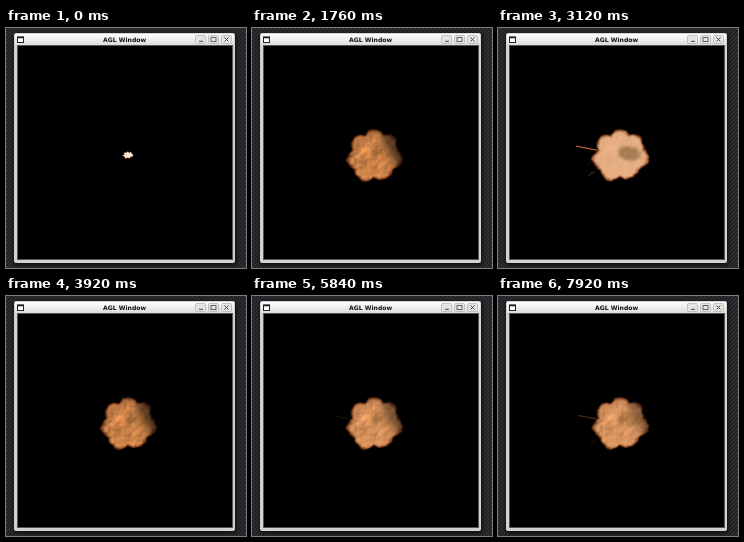
These frames come from a looping animation (240x240 px, 8 s). An HTML page with a canvas:

```html
<!DOCTYPE html>
<html lang="en">
<head>
<meta charset="utf-8">
<title>Explosion</title>
<style>
html, body { margin: 0; width: 100%; height: 100%; overflow: hidden; background: #222226; }
svg, canvas { position: absolute; left: 0; top: 0; display: block; }
canvas { left: 12px; top: 18px; }
text { font: bold 6.1px "DejaVu Sans", sans-serif; }
</style>
</head>
<body>
<svg width="240" height="240">
  <defs>
    <pattern id="weave" width="4" height="4" patternUnits="userSpaceOnUse">
      <rect width="4" height="4" fill="#232327"/>
      <path d="M-1 1L1 -1M0 4L4 0M3 5L5 3" stroke="#3a3a40" stroke-width=".9"/>
    </pattern>
    <linearGradient id="bar" x2="0" y2="1">
      <stop offset="0" stop-color="#fff"/><stop offset="1" stop-color="#dcdcda"/>
    </linearGradient>
    <filter id="soft"><feGaussianBlur stdDeviation="2"/></filter>
  </defs>
  <rect width="240" height="240" fill="url(#weave)"/>
  <rect x="8" y="6" width="222" height="231" fill="#000" opacity=".7" filter="url(#soft)"/>
  <rect x="8" y="5" width="221" height="230" rx="2" fill="#d2d2d0"/>
  <rect x="9" y="6" width="219" height="11" rx="1.5" fill="url(#bar)"/>
  <rect x="11" y="17" width="216" height="215" fill="#555"/>
  <rect x="12" y="18" width="214" height="213"/>
  <rect x="11.5" y="9" width="6" height="5.5" fill="#fff" stroke="#222"/>
  <path d="M11 9.5h7" stroke="#222" stroke-width="1.6"/>
  <text x="118.6" y="13.6" text-anchor="middle" fill="#111">AGL Window</text>
  <g fill="#e4e4e2" stroke="#b4b4b2" stroke-width=".8">
    <rect x="189.5" y="7.5" width="10" height="8" rx="1"/>
    <rect x="202.5" y="7.5" width="10" height="8" rx="1"/>
    <rect x="215.5" y="7.5" width="10" height="8" rx="1"/>
  </g>
  <g fill="none" stroke="#444">
    <path d="M193 13.3h4"/>
    <rect x="205" y="9.6" width="5" height="4" stroke-width=".8"/>
    <path d="M218.5 9.5l4 4m0 -4l-4 4"/>
  </g>
</svg>
<canvas id="view" width="214" height="213"></canvas>
<script>
const ctx = document.getElementById("view").getContext("2d");
const LOOP = 8000, STEP = 80, BLAST = 2160;
const W = 86, H = 76, LEFT = 68, TOP = 72;   // blast area inside the view
const CX = 110, CY = 109;
const WHITE = [255, 248, 238], STEEL = [165, 178, 184], BROWN = [160, 108, 52];
const img = ctx.createImageData(W, H);

const clamp = v => Math.min(1, Math.max(0, v));
const mix = (a, b, k) => a + (b - a) * k;
const mixAll = (a, b, k) => a.map((v, i) => mix(v, b[i], k));
const smooth = (a, b, v) => { const k = clamp((v - a) / (b - a)); return k * k * (3 - 2 * k); };

function hash(x, y) {
  let h = Math.imul(x, 374761393) + Math.imul(y, 668265263) | 0;
  h = Math.imul(h ^ h >>> 13, 1274126177);
  return ((h ^ h >>> 16) >>> 0) / 4294967296;
}

function noise(x, y) {
  const i = Math.floor(x), j = Math.floor(y);
  const u = smooth(0, 1, x - i), v = smooth(0, 1, y - j);
  return mix(mix(hash(i, j), hash(i + 1, j), u), mix(hash(i, j + 1), hash(i + 1, j + 1), u), v);
}

function smoke(x, y) {
  let sum = 0;
  for (let amp = .57, i = 0; i < 3; i++, amp *= .5, x *= 2.1, y *= 2.1) sum += amp * noise(x + i * 17, y);
  return sum;
}

function fireball(age) {
  const cool = age / BLAST, hot = Math.exp(-age / 700);
  const late = smooth(900, 1800, age), drift = cool * .6;
  const size = 1 - .83 * Math.exp(-age / 125);
  const squash = mix(.83, 1, smooth(450, 1000, age));
  const density = (1 - .15 * cool * cool) * (1 - .85 * smooth(1760, BLAST, age));
  const skin = [255 - 45 * cool, 225 - 105 * cool, 200 - 150 * cool];
  const edge = [.68, .42, .24].map((k, i) => skin[i] * k * (1 - .4 * cool));
  const heart = mixAll(mixAll(WHITE, STEEL, smooth(160, 460, age)), BROWN, smooth(500, 1150, age));
  const heartMix = .85 - .6 * smooth(1150, 1600, age);

  for (let p = 0, y = 0; y < H; y++) for (let x = 0; x < W; x++, p += 4) {
    const u = (x + LEFT + .5 - CX) / size, v = (y + TOP + .5 - CY) / size / squash;
    const r = Math.hypot(u, v), turn = Math.atan2(v, u);
    const n = smoke(u * .085 + 20, v * .085 + 9 - drift);
    const lit = n - smoke(u * .085 + 20.15, v * .085 + 9.15 - drift);

    // seven billows around the ball, with fine rays while it is hot
    const billow = 23.5 + 4 * Math.abs(Math.cos(3.5 * (turn + Math.PI / 2))) + 2 * Math.cos(2 * turn) * hot;
    const ray = noise(Math.cos(turn) * 5 + 40, Math.sin(turn) * 5 + 3) - .5;
    const depth = (billow - r + (n - .5) * 8 + ray * hot * 7) * size;

    const alpha = smooth(-1.2, 1.5, depth) * density;
    const inside = smooth(-.5, 4.5 * Math.min(1, size * 1.3), depth);
    const heat = heartMix * smooth(1.25, .6, Math.hypot((u - 10) / 12, (v + 1 + 4 * late) / 8) + (n - .5) * .8);
    const wisp = 1 - late * smooth(10, 27, u - v * .5 + (n - .5) * 24) * .55;
    const shade = (1 + mix(.12, .7, late) * ((n - .5) * .5 + lit * 1.2)) * wisp * alpha;
    for (let c = 0; c < 3; c++)
      img.data[p + c] = mix(edge[c], mix(skin[c], heart[c], heat), inside) * shade;
    img.data[p + 3] = 255;
  }
  ctx.putImageData(img, LEFT, TOP);
}

// one long spark to the left, then ever fainter seeded ones
function sparks(age) {
  const glow = smooth(500, 900, age) * (1 - smooth(1150, 1650, age));
  const reach = smooth(350, 1250, age) - .45 * smooth(1200, 1550, age);
  ctx.lineCap = "round";
  for (let i = 0; i < 6; i++) {
    const turn = Math.PI + .25 + (i && (hash(i, 5) - .5) * 1.8) - age / 20000;
    const tip = mix(27, i ? 32 + hash(i, 8) * 10 : 50, reach), root = i ? tip - 6 : 24;
    ctx.strokeStyle = `rgba(190,110,60,${glow * (i ? .45 / i : .9)})`;
    ctx.lineWidth = i ? .8 : 1.3;
    ctx.beginPath();
    ctx.moveTo(CX + Math.cos(turn) * root, CY + Math.sin(turn) * root);
    ctx.lineTo(CX + Math.cos(turn) * tip, CY + Math.sin(turn) * tip);
    ctx.stroke();
  }
}

let shown = -1;
function frame(now) {
  const t = Math.floor(now % LOOP / STEP) * STEP;
  if (t !== shown) {
    shown = t;
    ctx.fillRect(0, 0, 214, 213);
    fireball(t % BLAST);
    sparks(t % BLAST);
  }
  requestAnimationFrame(frame);
}
frame(performance.now());
</script>
</body>
</html>
```
